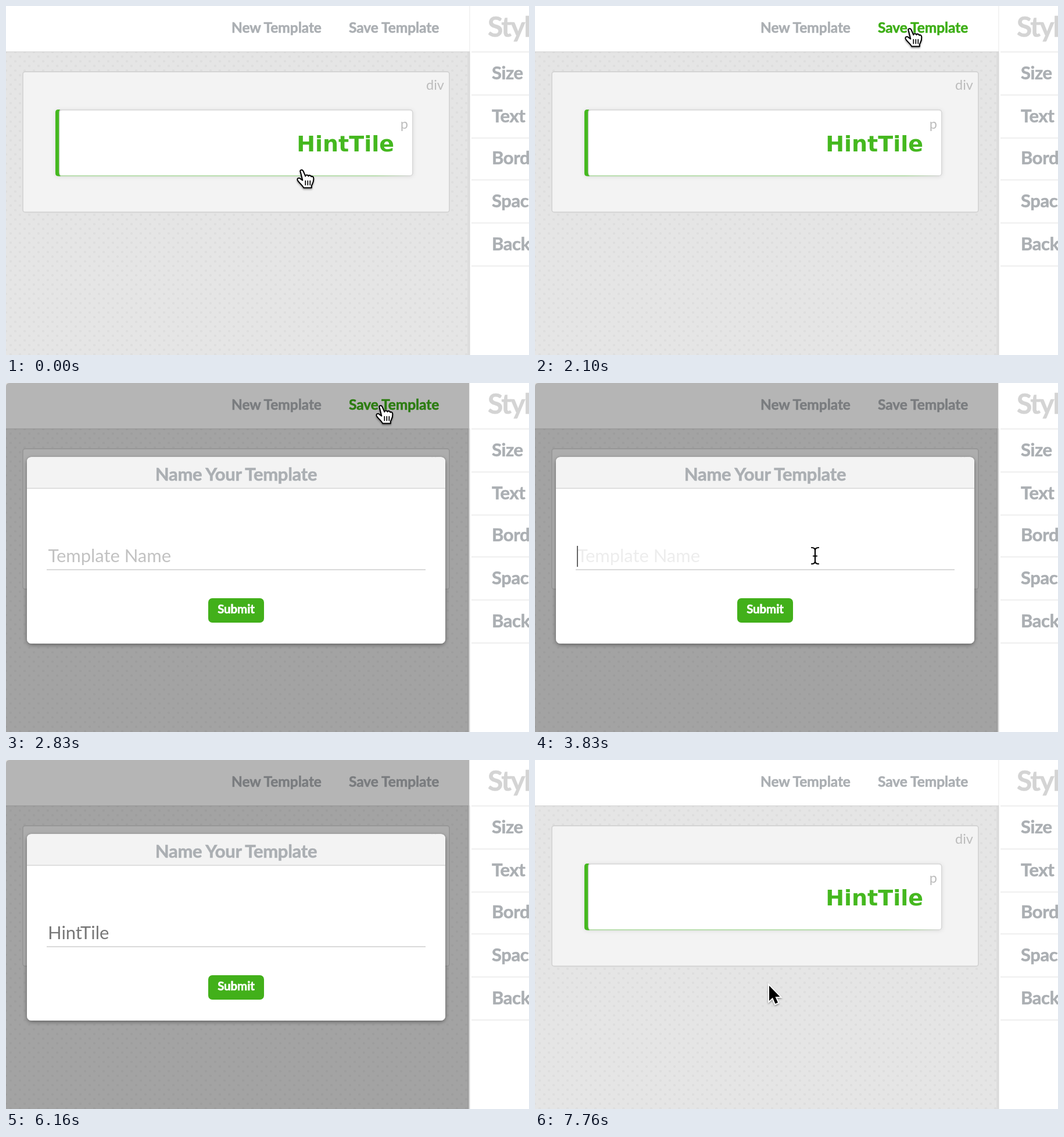
Write an HTML page that moves like this. It is 900x600 px and loops after 8 s.

```html
<!DOCTYPE html>
<html lang="en">
<head>
<meta charset="utf-8">
<title>Template editor</title>
<style>
  html, body { margin: 0; width: 100%; height: 100%; overflow: hidden; background: #fff; }
  svg { display: block; width: 900px; height: 600px; }
  text { font-family: Lato, "Open Sans", sans-serif; white-space: pre; }
  .bold { --ink: #abafb3; font-weight: 700; fill: var(--ink); stroke: var(--ink); stroke-width: .6; }
  .nav { font-size: 24.5px; letter-spacing: -.05px; }
  .side { font-size: 31px; letter-spacing: -.4px; }
  .title { font-size: 31px; letter-spacing: -.28px; }
  .panel-title { --ink: #d4d4d4; font-size: 48px; letter-spacing: -2px; }
  .submit { --ink: #fff; font-size: 20.5px; letter-spacing: -.1px; }
  .tag { font-size: 23.5px; fill: #bcbcbc; }
  .field { font-size: 31px; letter-spacing: -.05px; }
  .brand { font: 700 38px "DejaVu Sans", Verdana, sans-serif; fill: #45b81f; }
</style>
</head>
<body>
<svg viewBox="0 0 900 600" xmlns="http://www.w3.org/2000/svg">
  <defs>
    <pattern id="dots" width="16" height="16" patternUnits="userSpaceOnUse" x="4" y="3">
      <g fill="#dedede"><circle cx="4" cy="4" r="2.2"/><circle cx="12" cy="12" r="2.2"/></g>
    </pattern>
    <linearGradient id="base">
      <stop offset=".9" stop-color="#a8dc98"/>
      <stop offset="1" stop-color="#d8d8d8"/>
    </linearGradient>
    <filter id="soft" x="-10%" y="-20%" width="120%" height="140%">
      <feDropShadow dx="0" dy="1" stdDeviation="3.5" flood-opacity=".1"/>
    </filter>
    <filter id="lift" x="-10%" y="-10%" width="120%" height="120%">
      <feDropShadow dx="0" dy="2" stdDeviation="3.5" flood-opacity=".42"/>
    </filter>
    <filter id="drop" x="-40%" y="-40%" width="180%" height="180%">
      <feDropShadow dx="0" dy="2" stdDeviation="1.5" flood-opacity=".4"/>
    </filter>
    <path id="beamLine" d="M-6 -14Q0 -14 0 -9Q0 -14 6 -14M0 -9V9M-6 14Q0 14 0 9Q0 14 6 14M-3 .5H3"/>
  </defs>

  <rect width="900" height="600" fill="#e5e5e5"/>
  <rect y="79" width="797" height="521" fill="url(#dots)"/>
  <rect y="78" width="797" height="3" fill="#000" opacity=".02"/>
  <rect width="797" height="78" fill="#fff"/>
  <rect y="78" width="797" height="1" fill="#dadada"/>
  <text class="bold nav" x="388" y="46">New Template</text>
  <text class="bold nav" id="save" x="590" y="46">Save Template</text>

  <rect x="29" y="113" width="734" height="241.5" rx="4" fill="#f3f3f3" stroke="#d4d4d4" stroke-width="1.8"/>
  <text class="tag" x="754" y="144" text-anchor="end">div</text>
  <g filter="url(#soft)">
    <rect x="85" y="178" width="615.5" height="114.5" rx="5" fill="#d6d6d6"/>
    <rect x="92.5" y="179.5" width="606.5" height="111.7" rx="4" fill="#fff"/>
  </g>
  <rect x="90" y="291.3" width="606" height="1.4" fill="url(#base)"/>
  <path d="M93 178H90Q85 178 85 183V287.5Q85 292.5 90 292.5H94Q91.2 290 91.2 286V184Q91.2 180 93 178Z" fill="#45b81f"/>
  <text class="tag" x="692" y="211" text-anchor="end">p</text>
  <text class="brand" x="668" y="250" text-anchor="end">HintTile</text>

  <!-- The shade leaves out the area of the dialog -->
  <g id="shade">
    <path fill-rule="evenodd" opacity=".29"
      d="M0 0H797V600H0ZM44 127.5H748Q756 127.5 756 135.5V440Q756 448 748 448H44Q36 448 36 440V135.5Q36 127.5 44 127.5Z"/>
    <path d="M0 0H6Q0 0 0 6Z" fill="#e4e4e4"/>
  </g>

  <g id="modal">
    <rect x="36" y="127.5" width="720" height="320.5" rx="8" fill="#fff" filter="url(#lift)"/>
    <path d="M36 181V135.5Q36 127.5 44 127.5H748Q756 127.5 756 135.5V181Z" fill="#f3f3f3"/>
    <rect x="36" y="180" width="720" height="2" fill="#dfdfdf"/>
    <text class="bold title" x="396" y="168" text-anchor="middle">Name Your Template</text>
    <text class="field" id="hint" x="72.5" y="308">Template Name</text>
    <text class="field" id="value" x="72" y="308" fill="#777"></text>
    <rect id="caret" y="280" width="2" height="36" fill="#666"/>
    <rect x="70" y="320" width="652" height="2" fill="#d9d9d9"/>
    <rect id="button" x="348" y="370" width="96" height="42" rx="7"/>
    <text class="bold submit" x="396" y="396" text-anchor="middle">Submit</text>
  </g>

  <rect x="794" y="79" width="3" height="521" opacity=".03"/>
  <rect x="797" width="103" height="600" fill="#fff"/>
  <rect x="797" width="1.5" height="78" fill="#f0f0f0"/>
  <rect x="796.5" y="78" width="2" height="522" fill="#d9d9d9"/>
  <text class="bold panel-title" x="829" y="53">Styles</text>
  <g id="panel"></g>

  <g id="cursor">
    <g id="hand" filter="url(#drop)" transform="translate(-1.2 -.4)" stroke="#000" stroke-width="2" stroke-linecap="round" stroke-linejoin="round">
      <path fill="#fff" d="M0 3C-2 -1 3 -2.5 5 2L8.5 10C9 7 13 7.5 13.5 10C14.5 7.5 18 8.5 18.5 11C19.5 9 22.5 10.5 22.5 14C23 20 21 22 19 26V30H5.5C3 25 -3 21 -5 17C-6.5 13 -2 12 0 14.5L3.5 17Z"/>
      <path fill="none" stroke-width="1.7" d="M8.5 18V25M12.5 18V25M16.5 18V25"/>
    </g>
    <path id="arrow" filter="url(#drop)" stroke="#fff" stroke-width="3.6" paint-order="stroke"
      d="M0 1V27L6 21.5L10.5 32L15 30L10.5 20H18.5Z"/>
    <g id="beam" fill="none" stroke-linecap="round">
      <use href="#beamLine" stroke="#fff" stroke-width="4.5" opacity=".7"/>
      <use href="#beamLine" stroke="#000" stroke-width="2.2"/>
    </g>
  </g>
</svg>
<script>
const LOOP = 8000;
const el = id => document.getElementById(id);
const [save, shade, modal, hint, value, caret, button, cursor] =
  ["save", "shade", "modal", "hint", "value", "caret", "button", "cursor"].map(el);
const shapes = ["hand", "arrow", "beam"];

// Side panel rows: label, baseline, divider above.
el("panel").innerHTML = [
  ["Size", 126, 78], ["Text", 200, 152], ["Border", 272, 226],
  ["Spacing", 346, 298], ["Background", 420, 372], ["", 0, 446]
].map(([label, y, line]) =>
  `<rect x="801" y="${line}" width="99" height="2" fill="#efefef"/>` +
  `<text class="bold side" x="836" y="${y}">${label}</text>`).join("");

const easeIn = p => p ** 1.5;
const easeOut = p => 1 - (1 - p) ** 2;
const smooth = p => p * p * (3 - 2 * p);

// Pointer stops: time, x, y, easing towards the stop.
const path = [
  [570, 508, 283, smooth],
  [1370, 616, 92, easeIn],
  [1780, 644, 40, easeOut],
  [2850, 644, 40, smooth],
  [3560, 482, 297, smooth],
  [6290, 482, 297, smooth],
  [6960, 403, 387, smooth]
];

const word = "HintTile";
const keys = [4160, 4560, 4630, 4760, 5020, 5220, 5420, 5620];
const FOCUS = 3690, SENT = 7300, BLINK = 530;

const ramp = (t, from, to) => Math.min(1, Math.max(0, (t - from) / (to - from)));
const show = (node, on) => node.style.display = on ? "" : "none";

function pointer(t) {
  const i = path.findIndex(stop => stop[0] > t);
  if (i === 0) return path[0].slice(1, 3);
  if (i < 0) return path[path.length - 1].slice(1, 3);
  const [t0, x0, y0] = path[i - 1], [t1, x1, y1, ease] = path[i];
  const p = ease(ramp(t, t0, t1));
  return [x0 + (x1 - x0) * p, y0 + (y1 - y0) * p];
}

function pointerShape(t, y) {
  if (t < 2860) return y > 113 || y < 60 ? "hand" : "arrow";
  return t < 7000 && y > 278 && y < 322 ? "beam" : "arrow";
}

function render(t) {
  const [x, y] = pointer(t);
  const shape = pointerShape(t, y);
  cursor.setAttribute("transform", `translate(${x.toFixed(2)} ${y.toFixed(2)})`);
  shapes.forEach(id => show(el(id), id === shape));
  show(cursor, t < keys[0] || t >= 6290);

  save.style.setProperty("--ink", t > 1440 && t < 2900 && y < 60 ? "#3dae16" : "#abafb3");

  const open = ramp(t, 2360, 2725) * (1 - smooth(ramp(t, 7380, 7700)));
  const dim = ramp(t, 2420, 2820) * (1 - smooth(ramp(t, 7370, 7700)));
  modal.setAttribute("opacity", open);
  shade.setAttribute("opacity", dim);

  const sent = t >= SENT;
  const count = sent ? 0 : keys.filter(k => k <= t).length;
  const focused = t >= FOCUS && !sent;
  value.textContent = word.slice(0, count);
  show(hint, count === 0);
  hint.setAttribute("fill", focused ? "#ededed" : "#c2c2c2");

  const since = count ? t - keys[count - 1] : t - FOCUS;
  show(caret, focused && t < 7200 && Math.floor(since / BLINK) % 2 === 0);
  caret.setAttribute("x", count ? 73 + value.getComputedTextLength() : 72);

  button.setAttribute("fill", t > 6000 && y > 370 ? "#4cbf22" : "#42b01a");
}

function tick() {
  render(performance.now() % LOOP);
  requestAnimationFrame(tick);
}
tick();
</script>
</body>
</html>
```
